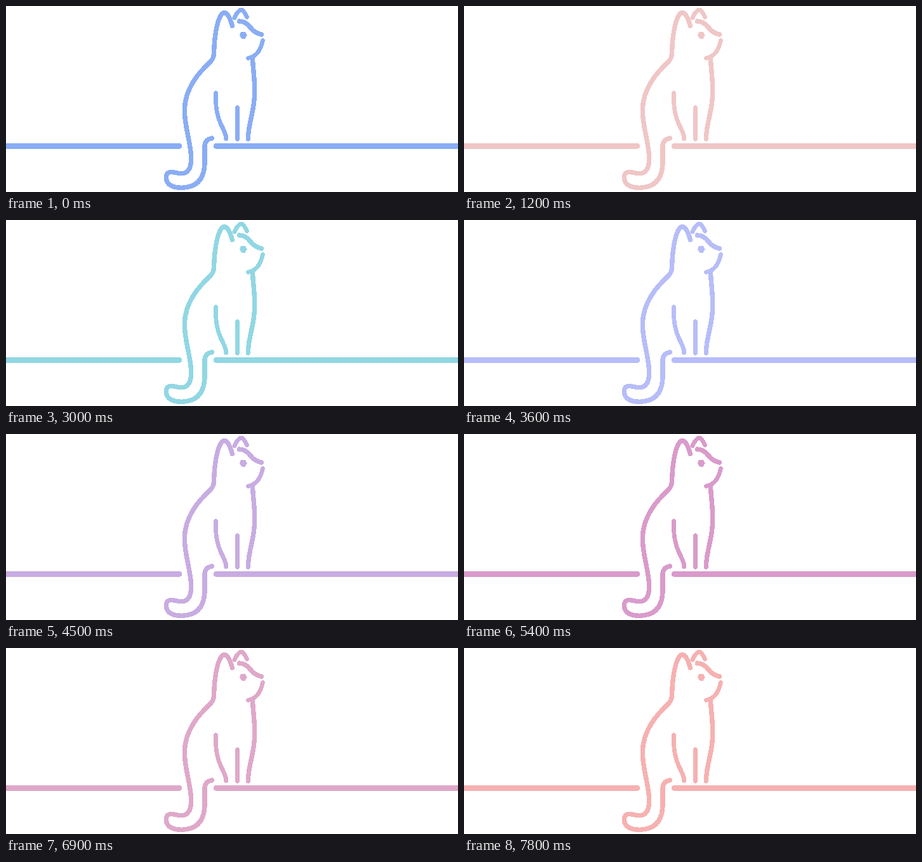
An HTML page that plays this animation: 712x294 px, repeating every 8000 ms.

```html
<!DOCTYPE html>
<html lang="en">
<head>
<meta charset="utf-8">
<title>Cat on a line</title>
<style>
  html, body { margin: 0; width: 100%; height: 100%; overflow: hidden; background: #fff; }
  svg { display: block; width: 712px; height: 294px; shape-rendering: crispEdges; }
  .cat { fill: none; stroke: currentColor; stroke-width: 7.4; stroke-linecap: round; stroke-linejoin: round; }
  .ground { stroke-width: 8.6; }
  .eye { fill: currentColor; stroke: none; }
</style>
</head>
<body>
<svg id="stage" viewBox="0 0 712 294">
  <g class="cat">
    <path class="ground" d="M-9 221.5H273M331 221.5H721"/>
    <!-- ear, back and tail -->
    <path d="M356.5 31.5C354.5 24 352 17 348 12.5Q344 8.5 340 12.5C331 24 328.5 50 327.5 74Q327.5 82 323 87C305 104 281.500 129 281.300 165C281.200 192 291.500 216 291.700 241C291.800 257 286 264.500 277 264.800C270 265 265 262 259 262.500C251 263.500 251 273 254.500 279C259 286 267 287.400 277 287.300C301 286.500 313 273 313 247V222C313 214 317 210.500 324.500 209"/>
    <!-- far ear, brow, muzzle -->
    <path stroke-width="6.8" d="M360 18.500Q363.500 10.500 368 7Q371 5 374 8Q377 11.500 379.500 17.500"/>
    <path d="M367.500 24C376 24.500 380 28 385 34C390 40.500 395 43.500 402.500 45"/>
    <path stroke-width="6.8" d="M404.500 54.500C402 66 396.500 80 381.500 82.500"/>
    <!-- chest and legs -->
    <path d="M388.500 84C389.500 103 391.800 117 391.800 134C391.800 168 382 181 381.300 210"/>
    <path stroke-width="6.8" d="M330.500 137.500C330 161 332.500 174 338.500 187C343 196 347 203 346.700 210"/>
    <path stroke-width="6.8" d="M364.500 160.500V210.500"/>
    <path class="eye" d="M370 40.500L377 41.500L379.500 46.500L376 52.500L370.500 51L368 46Z"/>
  </g>
</svg>
<script>
const LOOP = 8000, STEP = 300;

// [step, colour]; steps between entries are blended
const keys = [
  [0, '#8aadf4'], [1, '#b7bdf8'], [2, '#c6a0f6'], [3, '#f5bde6'],
  [4, '#f0c6c6'], [5, '#ee99a0'], [6, '#f5a97f'], [7, '#eed49f'],
  [8, '#a6da95'], [9, '#8bd5ca'], [10, '#91d7e3'], [11, '#8aadf4'],
  [12, '#b7bdf8'], [18, '#d99bcb'], [21, '#d0a2d9'], [26, '#f6b1b1']
];

const rgb = hex => [1, 3, 5].map(i => parseInt(hex.slice(i, i + 2), 16));

function colourAt(step) {
  const i = Math.max(1, keys.findIndex(k => k[0] >= step));
  const [a, from] = keys[i - 1], [b, to] = keys[i];
  const p = (step - a) / (b - a), end = rgb(to);
  return `rgb(${rgb(from).map((v, n) => Math.round(v + (end[n] - v) * p))})`;
}

const stage = document.getElementById('stage');
const start = performance.now();

function draw(now) {
  const t = Math.max(0, now - start) % LOOP;
  stage.style.color = colourAt(Math.floor(t / STEP));
  requestAnimationFrame(draw);
}
draw(start);
</script>
</body>
</html>
```
